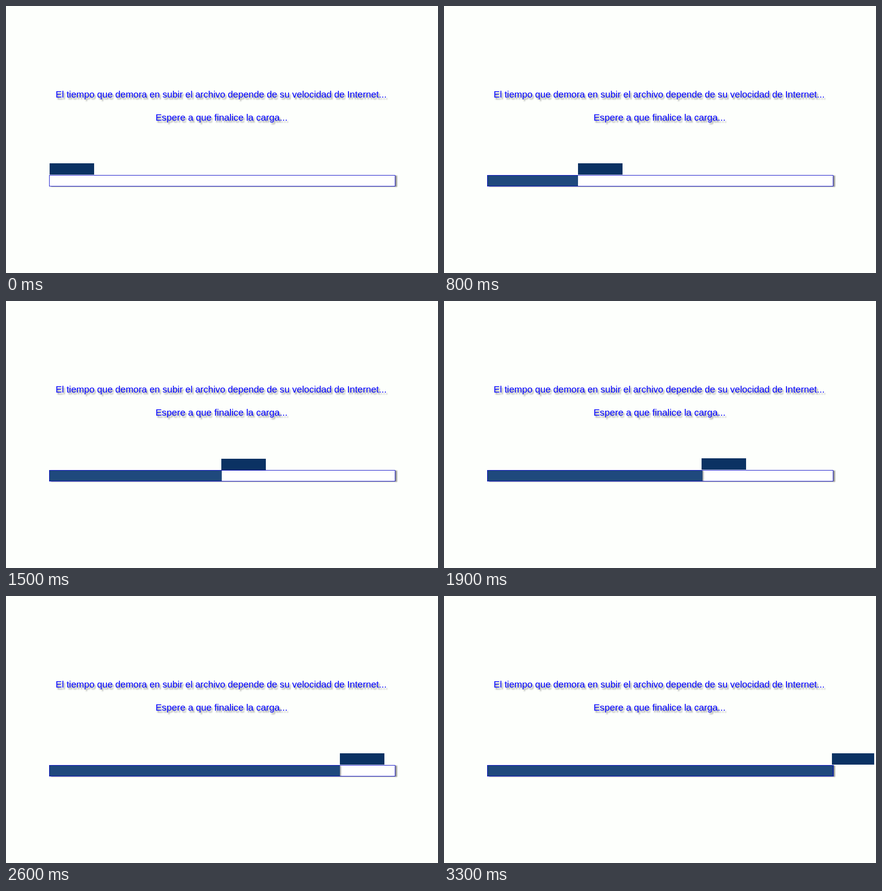
An HTML page for the animation above (3.4 s loop, 951 by 589 pixels).

```html
<!DOCTYPE html>
<html lang="es">
<head>
<meta charset="utf-8">
<title>Carga</title>
<style>
  html, body { margin: 0; width: 100%; height: 100%; overflow: hidden; background: #fdfffc; }
  #stage { position: absolute; left: 0; top: 0; width: 947px; height: 589px; overflow: hidden; }
  #stage div { position: absolute; box-sizing: border-box; }
  svg { position: absolute; left: 0; top: 0; }
  text {
    font-family: "Liberation Sans", Arial, sans-serif;
    fill: #0000ff;
    text-shadow: 3px 4px 3px rgba(0, 0, 0, .42);
  }
  #bar { left: 95px; top: 373px; width: 762px; height: 25px; background: #fff; box-shadow: 4px 1px 2px rgba(0, 0, 0, .4); }
  #track { left: 0; top: 0; width: 763px; height: 25px; overflow: hidden; }
  #fill { left: 0; top: 0; width: 0; height: 25px; background: #1f497d; }
  #frame { left: 0; top: 0; width: 762px; height: 25px; border: 1px solid #0000c8; }
  #badge { left: 0; top: 0; width: 98px; height: 25px; background: #0b3263; }
</style>
</head>
<body>
<div id="stage">
  <svg width="947" height="589">
    <text x="109.2" y="202" font-size="20.55">El tiempo que demora en subir el archivo depende de su velocidad de Internet...</text>
    <text x="329.2" y="253" font-size="20.75">Espere a que finalice la carga...</text>
  </svg>
  <div id="bar">
    <div id="track"><div id="fill"></div></div>
    <div id="frame"></div>
  </div>
  <div id="badge"></div>
</div>
<script>
  const LOOP = 3400, STEP = 100;

  // time, badge x, badge y, right edge of the fill
  const poses = [
    [0, 96, 347, 95],
    [500, 216, 347, 217],
    [1100, 373, 347, 372],
    [1500, 474, 348, 475],
    [2200, 637, 347, 639],
    [2600, 735, 347, 735],
    [3300, 854, 347, 858]
  ];

  function poseAt(t) {
    const i = Math.min(poses.findLastIndex(p => p[0] <= t), poses.length - 2);
    const a = poses[i], b = poses[i + 1];
    const k = (t - a[0]) / (b[0] - a[0]);
    return a.map((v, n) => Math.round(v + (b[n] - v) * k));
  }

  function play(id, style) {
    const frames = [];
    for (let t = 0; t <= LOOP; t += STEP) {
      const pose = poseAt(Math.min(t, LOOP - STEP));
      frames.push({ offset: t / LOOP, easing: "step-end", ...style(pose) });
    }
    document.getElementById(id).animate(frames, { duration: LOOP, iterations: Infinity });
  }

  play("badge", ([, x, y]) => ({ transform: `translate(${x}px, ${y}px)` }));
  play("fill", ([t, , , edge]) => ({
    width: `${edge - 95}px`,
    boxShadow: `2px 1px 3px rgba(0, 0, 0, ${t >= 1900 ? .45 : 0})`
  }));
</script>
</body>
</html>
```
